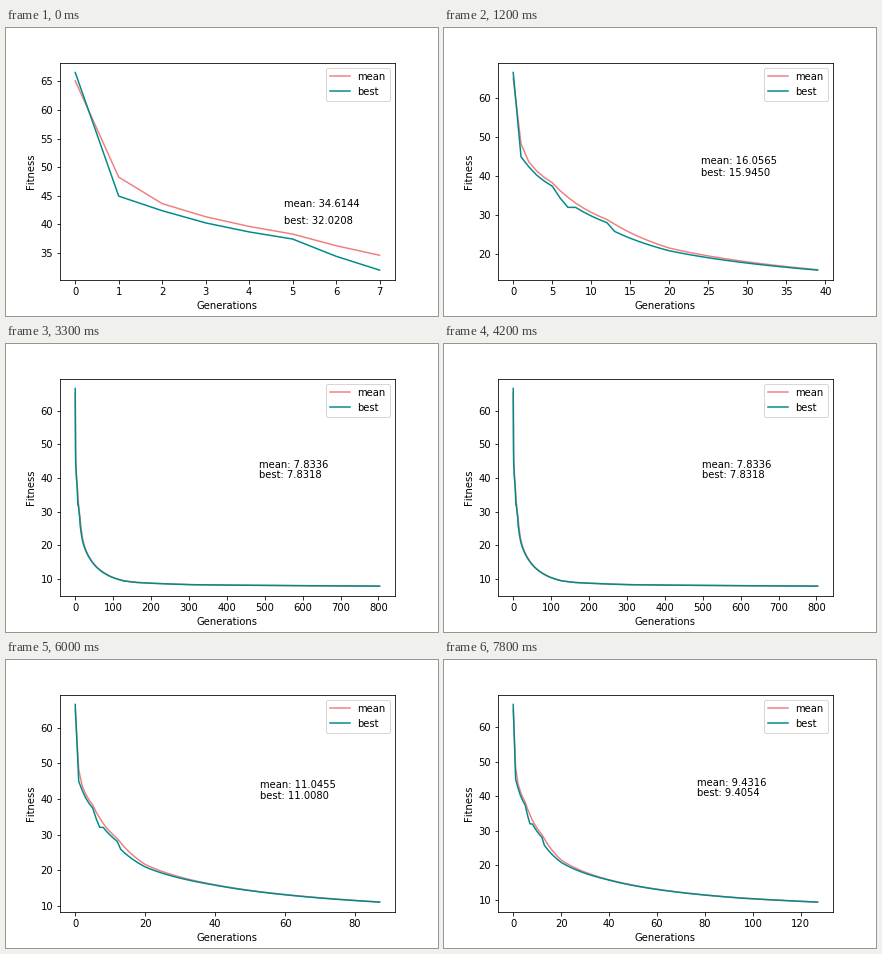
Write a matplotlib script that moves like this. It is 432x288 px and loops after 8000 ms.

```python
import numpy as np
import matplotlib.pyplot as plt
from matplotlib.animation import FuncAnimation

TICK_MS = 100
TICKS_PER_PLOT = 3
TOTAL_TICKS = 80
STEP = 8

# (generation, best, mean); power-law decay between the points
KEY_POINTS = [
    (0, 66.56, 65.1), (1, 44.95, 48.27), (2, 42.4, 43.64), (5, 37.45, 38.32),
    (7, 32.0208, 34.6144), (8, 32.0, 33.1), (12, 28.1, 28.9),
    (13, 25.85, 27.7), (20, 20.9, 21.6), (39, 15.945, 16.0565),
    (71, 12.081, 12.1508), (95, 10.5729, 10.598), (127, 9.4054, 9.4316),
    (160, 8.93, 8.95), (300, 8.27, 8.28), (803, 7.8318, 7.8336),
]

key_gens, key_best, key_mean = np.array(KEY_POINTS).T
gens = np.arange(key_gens[-1] + 1)


def decay(key_values):
    return np.exp(np.interp(np.log1p(gens), np.log1p(key_gens),
                            np.log(key_values)))


# Plots play in text order, so the 800s fall between 80 and 96
counts = [*range(STEP, 81, STEP), *range(800, 873, STEP), 88, 880,
          *range(96, 129, STEP)]

plt.rcParams["text.kerning_factor"] = 6
fig, ax = plt.subplots(figsize=(6, 4), dpi=72)
fig.subplots_adjust(left=0.125, right=0.9, bottom=0.125, top=0.88)
ax.set_xlabel("Generations")
ax.set_ylabel("Fitness")


def add_series(name, key_values, color, text_y):
    line, = ax.plot([], [], color=color, label=name)
    return name, decay(key_values), line, ax.text(0, text_y, "")


series = [add_series("mean", key_mean, "lightcoral", 43),
          add_series("best", key_best, "darkcyan", 40)]
ax.legend(loc="upper right")


def update(tick):
    count = counts[tick // TICKS_PER_PLOT]
    for name, values, line, text in series:
        shown = values[:count]
        line.set_data(gens[:count], shown)
        text.set_x(0.6 * count)
        text.set_text(f"{name}: {shown[-1]:.4f}")
    ax.relim()
    ax.autoscale_view()
    return [artist for entry in series for artist in entry[2:]]


anim = FuncAnimation(fig, update, frames=TOTAL_TICKS, interval=TICK_MS,
                     init_func=lambda: update(0), repeat=True, repeat_delay=0)
plt.show()
```
